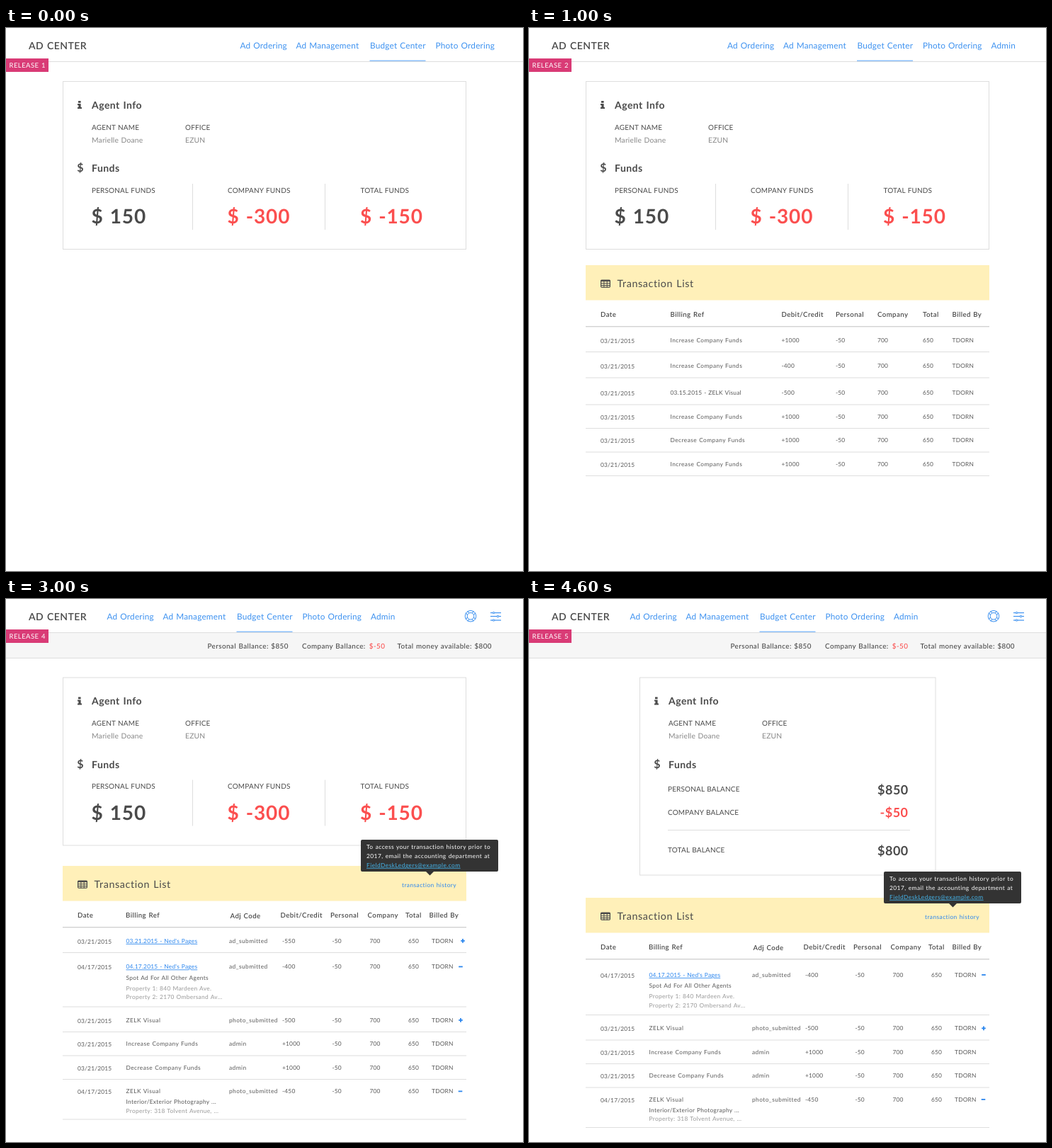
Write an HTML page that moves like this. It is 730x767 px and loops after 5 s.

```html
<!DOCTYPE html>
<html lang="en">
<head>
<meta charset="utf-8">
<title>Ad Center releases</title>
<style>
html, body { margin: 0; width: 100%; height: 100%; overflow: hidden; background: #fff; }
svg { display: block; width: 730px; height: 767px; text-rendering: geometricPrecision; }
text { font-family: Lato, "Open Sans", sans-serif; fill: #4a4a4a; word-spacing: .06em; white-space: pre; }
.title { font-size: 14px; font-weight: 600; letter-spacing: .45px; }
.nav { font-size: 11.8px; letter-spacing: .2px; fill: #3e92f0; }
.badge { font-size: 9.5px; letter-spacing: .45px; fill: #fff; }
.head { font-size: 14px; font-weight: 700; letter-spacing: .45px; }
.label { font-size: 10px; letter-spacing: .16px; }
.value { font-size: 10.3px; letter-spacing: .2px; fill: #888; }
.big { font-size: 28px; font-weight: 700; letter-spacing: .8px; }
.sum { font-size: 18px; font-weight: 700; letter-spacing: .5px; }
.bar { font-size: 9.9px; font-weight: 500; letter-spacing: .4px; }
.list { font-size: 14.3px; letter-spacing: .62px; }
.col { font-size: 9.7px; font-weight: 600; letter-spacing: .4px; }
.cell, .num, .sub, .tip { font-size: 8.4px; letter-spacing: .42px; fill: #5a5a5a; }
.num { letter-spacing: .2px; }
.sub { letter-spacing: .29px; }
.tip { letter-spacing: .45px; fill: #fff; }
.pale { fill: #999; }
.red { fill: #fb4f4f; }
.blue { fill: #2b86ee; }
.sky { fill: #45b4ea; }
.link { text-decoration: underline; }
</style>
</head>
<body>
<svg id="stage" viewBox="0 0 730 767"></svg>
<script>
const BLUE = '#3e92f0';
const text = (x, y, s, cls) => `<text x="${x}" y="${y}" class="${cls}">${s}</text>`;
const box = (x, y, w, h, fill, more = '') =>
  `<rect x="${x}" y="${y}" width="${w}" height="${h}" fill="${fill}" ${more}/>`;
const path = (d, color, width = 1) =>
  `<path d="${d}" fill="none" stroke="${color}" stroke-width="${width}"/>`;
const rule = (x, y, w, color = '#dedede') => box(x, y, w, 1, color);
const shift = (x, y, s) => `<g transform="translate(${x} ${y})">${s}</g>`;

const increase = 'Increase Company Funds', decrease = 'Decrease Company Funds';
const studio = 'ZELK Visual', paper = "Ned's Pages";

// Row: height, reference, code, amount, toggle sign, toggle x, details, details height
const simpleRows = [
  [36, increase, 'admin', '+1000'],
  [36.5, increase, 'admin', '-400'],
  [38, '03.15.2015 - ' + studio, 'photo_submitted', '-500'],
  [33.5, increase, 'admin', '+1000'],
  [33.5, decrease, 'ad_submitted', '+1000'],
  [33.5, increase, 'admin', '+1000']
];
const adDetails = [
  [15.4, 'Spot Ad For All Other Agents'],
  [30.2, 'Property 1: 840 Mardeen Ave.'],
  [43, 'Property 2: 2170 Ombersand Av...']
];
const photoDetails = [
  [15, 'Interior/Exterior Photography ...'],
  [27.2, 'Property: 318 Tolvent Avenue, ...']
];
const adRow = h => [h, '04.17.2015 - ' + paper, 'ad_submitted', '-400', '-', 642, adDetails, 40];
const detailRows = [
  [35.5, studio, 'photo_submitted', '-500', '+', 642],
  [33.5, increase, 'admin', '+1000'],
  [33.5, decrease, 'admin', '+1000'],
  [33.5, studio, 'photo_submitted', '-450', '-', 641.5, photoDetails, 23]
];
const releaseRows = [
  null, simpleRows, simpleRows,
  [[36, '03.21.2015 - ' + paper, 'ad_submitted', '-550', '+', 645], adRow(36.5), ...detailRows],
  [adRow(39), ...detailRows]
];
const listTop = [0, 335, 370.5, 377, 422];

function header(n) {
  const x = [330.5, 280, 280, 142.5, 142.5][n];
  const items = [[0, 'Ad Ordering'], [79, 'Ad Management'], [183.5, 'Budget Center'], [276, 'Photo Ordering']];
  if (n) items.push([372.5, 'Admin']);
  let s = '';
  if (n > 1) {
    s += box(0, 47, 730, 37, '#f6f6f6') + rule(0, 83, 730) +
      text(284.5, 70, 'Personal Ballance: $850', 'bar') +
      text(418, 70, 'Company Ballance:', 'bar') + text(512.8, 70, '$-50', 'bar red') +
      text(552.5, 70, 'Total money available: $800', 'bar');
  }
  s += rule(0, 47, 730) + box(x + 183, 45.5, 79, 1.5, '#8cc0fa') +
    text(32, 29.5, 'AD CENTER', 'title') +
    items.map(([dx, label]) => text(x + dx, 29, label, 'nav')).join('') +
    box(0, 43, 60, 19, '#d93b76') + text(4.5, 56.2, 'RELEASE ' + (n + 1), 'badge');
  return n > 2 ? s + headerIcons() : s;
}

function headerIcons() {
  const ring = r => `<circle r="${r}" fill="none" stroke="${BLUE}"/>`;
  let s = ring(7.8) + ring(4.8);
  for (let a = 45; a < 360; a += 90)
    s += `<g transform="rotate(${a})">${path('M4.5-1.8H8.2M4.5 1.8H8.2', BLUE)}</g>`;
  const sliders = [[19.5, 688.5], [24.5, 694.5], [30, 688.5]].map(([y, x]) =>
    path(`M684 ${y}H699`, BLUE, 1.2) + box(x - 1.5, y - 1, 3, 2, '#fff', `rx="1" stroke="${BLUE}"`));
  return shift(656, 24.2, s) + sliders.join('');
}

function agentCard(n) {
  const last = n === 4;
  let s = box(80.5, 75.5, last ? 417.5 : 569, last ? 279 : 237, '#fff', 'stroke="#dedede"') +
    `<path fill="#4a4a4a" d="M102 103h3.6v2.8H102zM101 107h4.6v5H107v2H101v-2h1.4v-3H101z"/>` +
    text(121, 113.5, 'Agent Info', 'head') +
    text(121, 143.6, 'AGENT NAME', 'label') + text(253, 143.6, 'OFFICE', 'label') +
    text(121, 161.5, 'Marielle Doane', 'value') + text(253, 161.5, 'EZUN', 'value') +
    `<text x="100.3" y="203.3" style="font-size:16px;font-weight:700">$</text>` +
    text(121, 203, 'Funds', 'head');
  if (!last) {
    const funds = [[121, 'PERSONAL', '$ 150', ''], [313, 'COMPANY', '$ -300', 'red'], [500.5, 'TOTAL', '$ -150', 'red']];
    s += funds.map(([x, name, sum, color]) =>
      text(x, 232.7, name + ' FUNDS', 'label') + text(x - .5, 276, sum, 'big ' + color)).join('') +
      box(263, 220, 1, 65, '#dedede') + box(450, 220, 1, 65, '#dedede');
  }
  s = shift(last ? 76 : 0, n > 1 ? 35.5 : 0, s);
  if (last) {
    const sums = [[272.2, 'PERSONAL', 492, '$850', ''], [304.8, 'COMPANY', 495.5, '-$50', 'red'], [358.3, 'TOTAL', 492, '$800', '']];
    s += rule(196, 326, 342) + sums.map(([y, name, x, sum, color]) =>
      text(196, y, name + ' BALANCE', 'label') + text(x, y + 3.4, sum, 'sum ' + color)).join('');
  }
  return s;
}

function rowMarkup(row, y, n) {
  const [h, ref, code, amount, sign, signX, details = []] = row;
  const mid = y + h - 16.8, base = mid + 3;
  const linked = n > 2 && /^\d/.test(ref);
  const cells = [
    [101, details.length ? '04/17/2015' : '03/21/2015'],
    ...(n > 1
      ? [[315, code], [390, amount], [460.5, '-50'], [513.5, '700'], [568, '650'], [601, 'TDORN']]
      : [[356.5, amount], [433, '-50'], [492, '700'], [556, '650'], [597.5, 'TDORN']])
  ];
  const refX = n > 1 ? 169.5 : 199.5;
  let s = cells.map(([x, v], i) => text(x, base + (i ? 0 : .6), v, /^[a-z]/.test(v) ? 'cell' : 'num')).join('') +
    text(refX, base, ref, (/^\d/.test(ref) ? 'num' : 'cell') + (linked ? ' link blue' : '')) +
    details.map(([dy, v], i) => text(refX, base + dy, v, i ? 'sub pale' : 'sub')).join('');
  if (sign) s += path(`M${signX - 2.8} ${mid}h5.6` + (sign === '+' ? `m-2.8-2.8v5.6` : ''), '#2b86ee', 1.8);
  return s;
}

function transactions(n) {
  const top = listTop[n];
  const columns = n > 1
    ? [[101, 'Date'], [169, 'Billing Ref'], [316.5, 'Adj Code', .6], [387.5, 'Debit/Credit', -.5], [458, 'Personal'],
       [510.5, 'Company'], [564, 'Total'], [597.5, 'Billed By']]
    : [[101, 'Date'], [199.5, 'Billing Ref'], [356.5, 'Debit/Credit', -.5], [433, 'Personal'],
       [492, 'Company'], [556, 'Total'], [597.5, 'Billed By']];
  let y = top + 86.7;
  let s = box(80, top, 570, 49.5, '#fff0b9') +
    shift(101, top + 20.5, box(.6, .6, 12.8, 10, 'none', 'rx="1" stroke="#4a4a4a" stroke-width="1.2"') +
      box(.6, .6, 12.8, 2, '#4a4a4a') + path('M0 5.2H14M0 8H14M4.9 1V11M9.2 1V11', '#4a4a4a')) +
    text(124.5, top + 31.2, 'Transaction List', 'list') +
    columns.map(([x, name, dy = 0]) => text(x, top + 73.3 + dy, name, 'col')).join('') +
    box(80, y - .7, 570, 1.4, '#d2d2d2');
  for (const row of releaseRows[n]) {
    s += rowMarkup(row, y, n);
    y += row[0] + (row[7] || 0);
    s += rule(80, y - .7, 570);
  }
  return n > 2 ? s + tooltip(top) : s;
}

function tooltip(top) {
  return text(559, top + 30.3, 'transaction history', 'cell blue') +
    shift(0, top, box(501, -37, 194, 45, '#333', 'rx="2"') +
      '<path d="M593 8h11l-5.5 5.5z" fill="#333"/>' +
      text(509, -23.9, 'To access your transaction history prior to', 'tip') +
      text(509, -11.1, '2017, email the accounting department at', 'tip') +
      text(509, 1.8, 'FieldDeskLedgers@example.com', 'tip sky link'));
}

const scenes = [0, 1, 2, 3, 4].map(n => header(n) + agentCard(n) + (n ? transactions(n) : ''));
const stage = document.getElementById('stage');
let shown = -1;

function draw() {
  const n = Math.floor(performance.now() / 1000) % scenes.length;
  if (n !== shown) stage.innerHTML = scenes[shown = n];
  requestAnimationFrame(draw);
}
draw();
</script>
</body>
</html>
```
